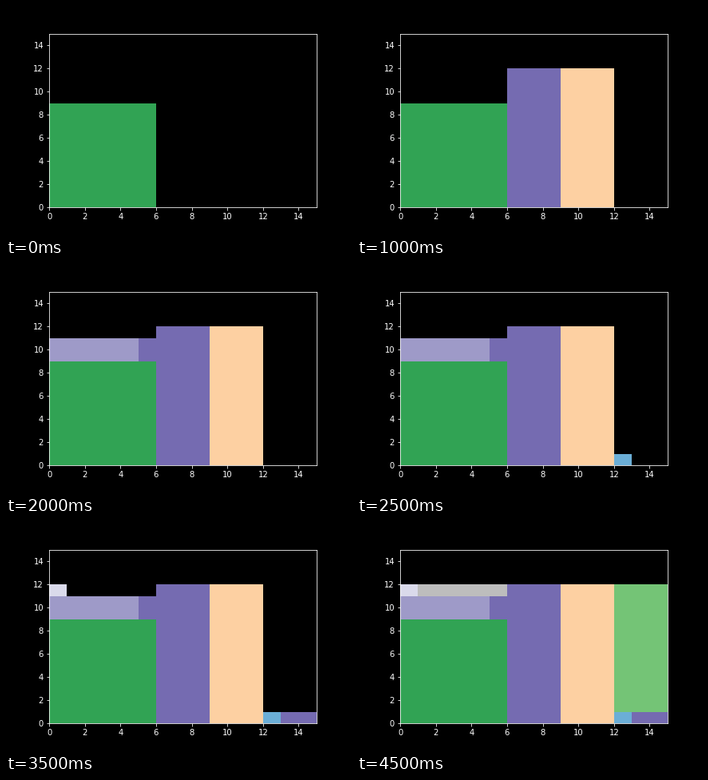
Recreate the animation shown at these times as a matplotlib script. Size 432 px wide and 288 px high, loop 5 s.

```python
import matplotlib.pyplot as plt
from matplotlib.animation import FuncAnimation
from matplotlib.patches import Rectangle

plt.style.use("dark_background")
plt.rcParams["font.family"] = "DejaVu Sans"

SIZE = 15
STEP_MS = 500

# x, y, width, height, colour, in order of placement
BLOCKS = [
    (0, 0, 6, 9, "#31a354"),
    (6, 0, 3, 12, "#756bb1"),
    (9, 0, 3, 12, "#fdd0a2"),
    (0, 9, 5, 2, "#9e9ac8"),
    (5, 9, 1, 2, "#756bb1"),
    (12, 0, 1, 1, "#6baed6"),
    (13, 0, 2, 1, "#756bb1"),
    (0, 11, 1, 1, "#dadaeb"),
    (1, 11, 5, 1, "#bdbdbd"),
    (12, 1, 3, 11, "#74c476"),
]

fig = plt.figure(figsize=(6, 4), dpi=72, facecolor="black")
ax = fig.add_axes([0.125, 0.125, 0.775, 0.755], facecolor="black")
ax.set(xlim=(0, SIZE), ylim=(0, SIZE),
       xticks=range(0, SIZE, 2), yticks=range(0, SIZE, 2))

rects = [
    ax.add_patch(Rectangle((x, y), w, h, facecolor=color, edgecolor="none"))
    for x, y, w, h, color in BLOCKS
]


def draw(step):
    for i, rect in enumerate(rects):
        rect.set_visible(i <= step)
    return rects


def reset():
    return draw(0)


anim = FuncAnimation(fig, draw, frames=len(BLOCKS), init_func=reset,
                     interval=STEP_MS, repeat=True, repeat_delay=0)
plt.show()
```
